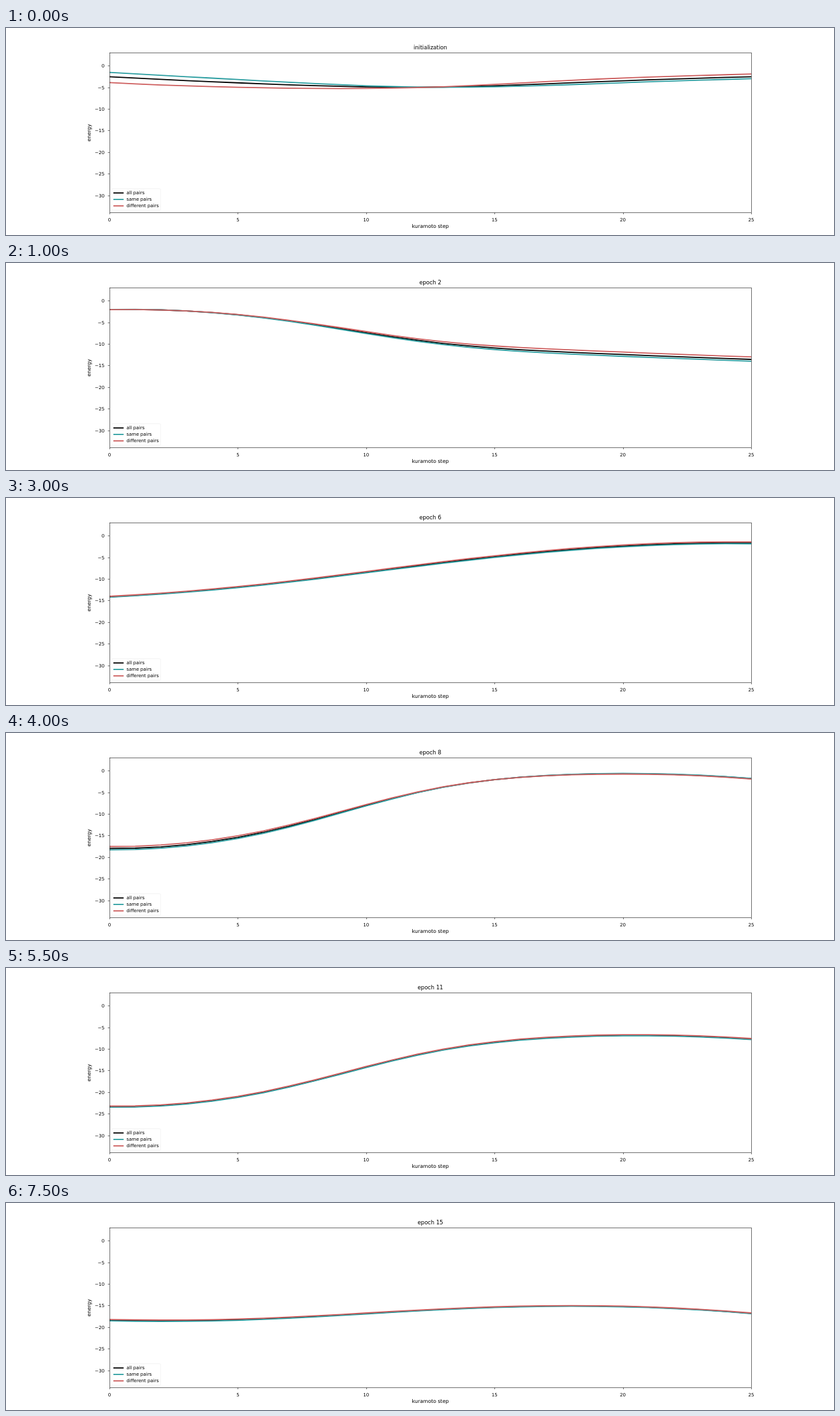
Animation of 1280x320 px, one loop 8 s. Source, as an HTML page with a canvas:

```html
<!DOCTYPE html>
<html lang="en">
<head>
<meta charset="utf-8">
<title>Energy per step</title>
<style>
html, body { margin: 0; width: 100%; height: 100%; overflow: hidden; background: #fff; }
canvas { display: block; }
</style>
</head>
<body>
<canvas id="stage" width="1280" height="320"></canvas>
<script>
const ctx = document.getElementById("stage").getContext("2d");
const LEFT = 160, RIGHT = 1152, TOP = 38, BOTTOM = 285, STEPS = 25;
const EPOCHS = 16, EPOCH_MS = 500;
const BLACK = "#000", TEAL = "#2a9da0", RED = "#cd5c5c";
const THIN = 0.57, THICK = 1.78;

// Key epochs; those between are blends of their neighbours.
// mean: evenly spaced heights of the black curve; gap: red minus black, early and late.
const keys = [
  { epoch: 0, mean: [75.3, 86.7, 91.5, 83.5, 75.4], gap: [9, -4.2] },
  { epoch: 2, mean: [72, 85.5, 122, 139.4, 149], gap: [0.2, -3.8] },
  { epoch: 4, mean: [110, 104, 90, 80, 72], gap: [-1, -2] },
  { epoch: 6, mean: [152.8, 132.8, 102.3, 77.4, 69.5], gap: [-0.8, -1.7] },
  { epoch: 8, mean: [178.5, 151.3, 87.5, 63.4, 70.5], gap: [-3, 0.6] },
  { epoch: 9, mean: [214.5, 180, 105, 75, 73], gap: [-2, -1] },
  { epoch: 10, mean: [179, 159, 101.2, 73.7, 75.8], gap: [-3, -1.8] },
  { epoch: 11, mean: [214.5, 190, 130, 105, 110], gap: [-1, -1] },
  { epoch: 13, mean: [218.7, 199.6, 155, 141.2, 152.8], gap: [-0.4, -0.8] },
  { epoch: 15, mean: [181.3, 178.8, 165.3, 159.3, 170.6], gap: [-1.2, -0.6] }
];

const mix = (a, b, t) => a + (b - a) * t;
const stepX = s => mix(LEFT, RIGHT, s / STEPS);
const energyY = e => 58.6 - 6.68 * e;

function curveOf(epoch) {
  const next = keys.find(k => k.epoch >= epoch);
  const prev = keys.findLast(k => k.epoch <= epoch);
  const t = (epoch - prev.epoch) / (next.epoch - prev.epoch || 1);
  const blend = part => prev[part].map((v, i) => mix(v, next[part][i], t));
  return { mean: spline(blend("mean")), gap: blend("gap") };
}

// Cubic spline through evenly spaced heights, with parabolic ends.
function spline(h) {
  const last = h.length - 1, bend = h.map(() => 0);
  for (let pass = 0; pass < 30; pass++) {
    for (let i = 1; i < last; i++) {
      bend[i] = (6 * (h[i - 1] - 2 * h[i] + h[i + 1]) - bend[i - 1] - bend[i + 1]) / 4;
    }
    bend[0] = bend[1];
    bend[last] = bend[last - 1];
  }
  return step => {
    const t = step / STEPS * last, i = Math.min(last - 1, Math.floor(t));
    const b = t - i, a = 1 - b;
    return a * h[i] + b * h[i + 1] + ((a ** 3 - a) * bend[i] + (b ** 3 - b) * bend[i + 1]) / 6;
  };
}

function gapAt([early, late], step) {
  const t = Math.min(1, step / 20);
  return mix(early, late, t * t * (3 - 2 * t));
}

function line(points, color, width) {
  ctx.beginPath();
  points.forEach(([x, y]) => ctx.lineTo(x, y));
  ctx.strokeStyle = color;
  ctx.lineWidth = width;
  ctx.stroke();
}

function label(text, x, y, size, align = "center") {
  ctx.font = `${size}px "DejaVu Sans", sans-serif`;
  ctx.textAlign = align;
  ctx.fillStyle = BLACK;
  ctx.fillText(text, x, y);
}

function drawCurves({ mean, gap }) {
  ctx.save();
  ctx.beginPath();
  ctx.rect(LEFT, TOP, RIGHT - LEFT, BOTTOM - TOP);
  ctx.clip();
  ctx.lineJoin = "round";
  ctx.lineCap = "square";
  for (const [color, share] of [[BLACK, 0], [TEAL, -0.73], [RED, 1]]) {
    const points = [];
    for (let s = 0; s <= STEPS; s++) points.push([stepX(s), mean(s) + share * gapAt(gap, s)]);
    line(points, color, THICK);
  }
  ctx.restore();
}

function drawAxes() {
  ctx.strokeStyle = BLACK;
  ctx.lineWidth = THIN;
  ctx.strokeRect(LEFT + 0.5, TOP + 0.5, RIGHT - LEFT, BOTTOM - TOP);
  for (let s = 0; s <= STEPS; s += 5) {
    const x = Math.round(stepX(s)) + 0.5;
    line([[x, BOTTOM + 0.5], [x, BOTTOM + 3]], BLACK, THIN);
    label(s, stepX(s), 299, 7.11);
  }
  for (let e = 0; e >= -30; e -= 5) {
    const y = Math.floor(energyY(e)) + 0.5;
    line([[LEFT - 2.5, y], [LEFT, y]], BLACK, THIN);
    label(e < 0 ? "\u2212" + -e : "0", 152.2, Math.round(energyY(e) + 2.7), 7.11, "right");
  }
  label("kuramoto step", 656, 309, 7.82);
  ctx.save();
  ctx.translate(130.7, 162);
  ctx.rotate(-Math.PI / 2);
  label("energy", 0, 0, 7.82);
  ctx.restore();
}

function drawLegend() {
  ctx.beginPath();
  ctx.roundRect(163.5, 248.5, 75.5, 33, 1.5);
  ctx.fillStyle = "#fff";
  ctx.fill();
  ctx.strokeStyle = "#eee";
  ctx.lineWidth = 0.7;
  ctx.stroke();
  [["all pairs", BLACK], ["same pairs", TEAL], ["different pairs", RED]].forEach(([text, color], i) => {
    const y = 255 + 10 * i;
    line([[166, y], [181.8, y]], color, THICK);
    label(text, 186.2, y + 2.3, 7.11, "left");
  });
}

function frame(now) {
  const epoch = Math.floor(now / EPOCH_MS) % EPOCHS;
  ctx.fillStyle = "#fff";
  ctx.fillRect(0, 0, 1280, 320);
  drawCurves(curveOf(epoch));
  drawAxes();
  drawLegend();
  label(epoch ? "epoch " + epoch : "initialization", 656, 33.2, 8.53);
  requestAnimationFrame(frame);
}
frame(0);
</script>
</body>
</html>
```
